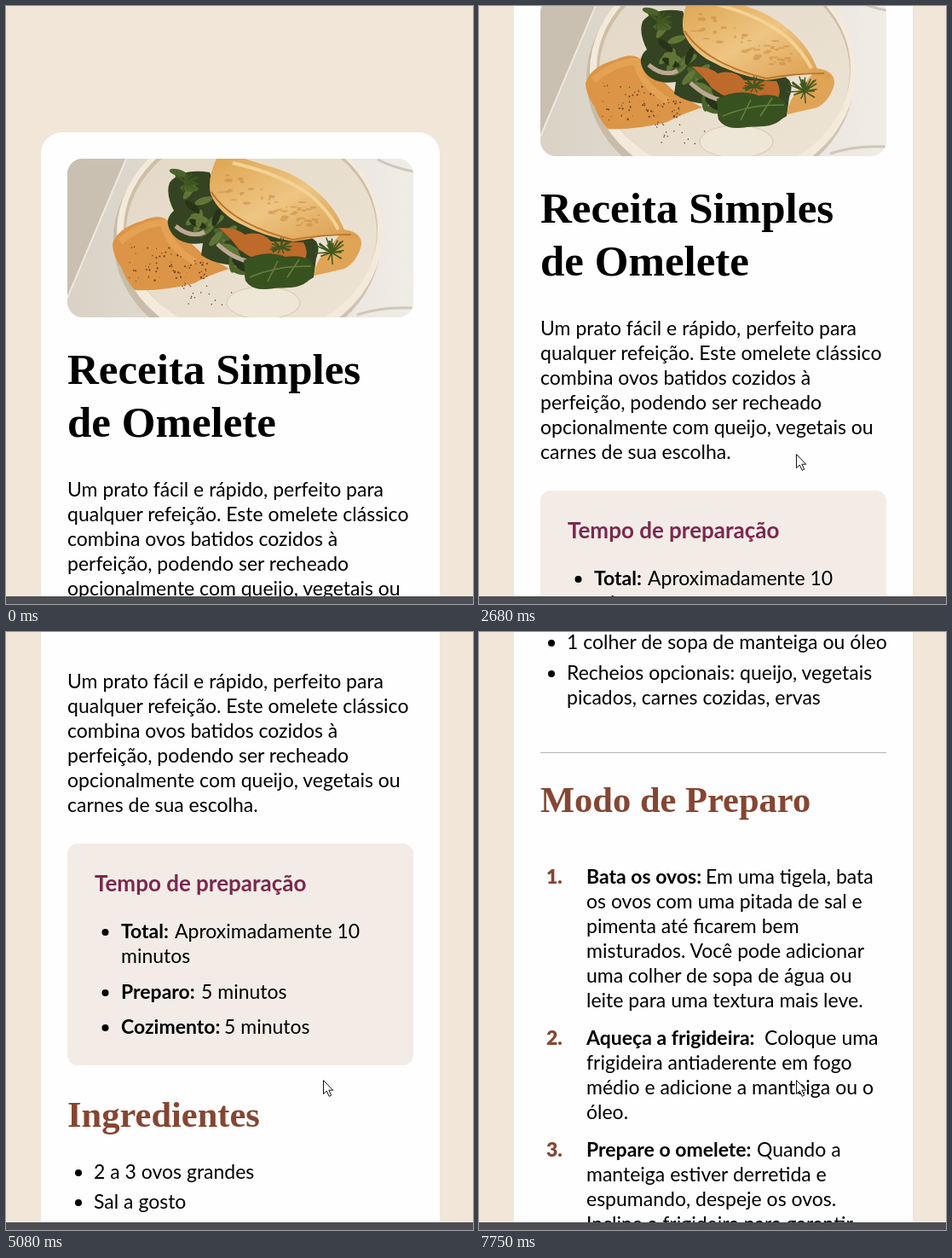
Recreate the animation shown at these times as an HTML page. Size 548 px wide and 701 px high, loop 8000 ms.

```html
<!DOCTYPE html>
<html lang="pt">
<head>
<meta charset="utf-8">
<style>
  html, body { margin: 0; width: 100%; height: 100%; overflow: hidden; background: #f2e6d9; }
  svg { display: block; }
  text { font: 23px Lato, sans-serif; white-space: pre; }
  .bold { font-weight: 700; }
  .sub { font-size: 26px; font-weight: 700; fill: #7b284f; }
  .title, .head { font-family: "Liberation Serif", serif; font-weight: 700; }
  .title { font-size: 51px; }
  .head { font-size: 42.5px; fill: #854632; }
  .num { font-weight: 900; fill: #854632; }
</style>
</head>
<body>
<svg width="548" height="701" viewBox="0 0 548 701">
  <defs>
    <clipPath id="photo"><rect x="72" y="179" width="406" height="186" rx="18"/></clipPath>
    <linearGradient id="marble"><stop offset="0" stop-color="#d9d2c5"/><stop offset="1" stop-color="#f0ece6"/></linearGradient>
    <linearGradient id="plate" x2="1" y2="1"><stop offset="0" stop-color="#e3d8c6"/><stop offset="1" stop-color="#eee4d5"/></linearGradient>
    <linearGradient id="egg" x2="1" y2="1"><stop offset="0" stop-color="#dda450"/><stop offset=".5" stop-color="#eec583"/><stop offset="1" stop-color="#d99a49"/></linearGradient>
  </defs>
  <g id="page">
    <rect x="41" y="148" width="468" height="2200" rx="25" fill="#fefefe"/>
    <g clip-path="url(#photo)">
      <path d="M72 179H478V365H72Z" fill="url(#marble)"/>
      <path d="M72 179H141L72 342Z" fill="#c9c0b1"/>
      <path d="M141 179L72 342" stroke="#eee8de" stroke-width="2"/>
      <path d="M436 180q20 10 42 14M412 362q30 -10 66 -8" fill="none" stroke="#cfc7bb" stroke-width="3"/>
      <ellipse cx="283" cy="274" rx="157" ry="134" fill="#b9a78e" opacity=".55"/>
      <ellipse cx="286" cy="266" rx="156" ry="134" fill="#f3eadc"/>
      <ellipse cx="287" cy="262" rx="149" ry="124" fill="#cfbfa7"/>
      <ellipse cx="288" cy="265" rx="147" ry="123" fill="url(#plate)"/>
      <ellipse cx="302" cy="348" rx="43" ry="19" fill="#eee6d7" stroke="#d5c7b0"/>
      <path d="M125 279Q131 260 160 252Q184 241 194 256L232 292Q252 302 262 308Q236 316 221 325Q180 335 151 333Q141 322 136 308Q125 292 125 279Z" fill="#dc9546"/>
      <path d="M134 276Q160 254 185 254Q190 282 222 300" fill="none" stroke="#e9ac60" stroke-width="8" opacity=".6"/>
      <g id="pepper" fill="#704322"/>
      <path d="M192 207Q206 190 239 195L252 225Q252 249 285 258L355 270Q372 276 364 296L361 318Q340 333 313 330Q290 336 281 322L278 303Q250 306 229 292L231 278Q202 282 192 262Q186 249 197 240Q187 220 192 207Z" fill="#344321"/>
      <g id="leaves"/>
      <path d="M199 258q18 15 34 7M248 279q18 17 36 20" fill="none" stroke="#bda993" stroke-width="5"/>
      <path d="M250 260q21 0 30 8q20 -5 31 8l38 1q7 12 1 22q-16 -4 -26 1l-13 -10q-14 8 -26 3l-12 -8q-8 -12 -23 -25Z" fill="#be6a2a"/>
      <path d="M279 298Q304 285 328 294Q360 290 362 311Q354 333 320 330Q289 337 281 320Z" fill="#38521f"/>
      <path d="M286 318Q318 304 358 305M307 323l12 -24M330 318l14 -21" fill="none" stroke="#66803c" stroke-width="1.5"/>
      <path d="M397 262Q418 265 417 280Q412 300 397 308L362 316Q362 300 378 284Z" fill="#e0a456"/>
      <path d="M247 179Q236 202 240 220Q247 238 267 251Q300 270 337 276Q360 273 378 268Q400 268 414 274Q409 264 397 263Q387 236 364 217Q339 195 305 187L274 177Z" fill="url(#egg)"/>
      <path d="M241 218Q265 256 337 274Q368 268 405 268" fill="none" stroke="#bd782e" stroke-width="2"/>
      <path d="M266 184Q328 198 362 226Q381 244 390 262" fill="none" stroke="#f3d294" stroke-width="4"/>
      <g id="toast" fill="#c18136" opacity=".45"/>
      <path id="dill" fill="none" stroke="#40571f" stroke-width="1.5"/>
    </g>
    <rect x="72" y="757" width="406" height="260" rx="12" fill="#f3ece6"/>
    <rect x="72" y="1376" width="406" height="1" fill="#b5b3b1"/>
    <g id="copy"></g>
  </g>
  <path id="cursor" d="M.5 .5V16.6L4.3 13.1L7.2 19.3L9.7 18.1L6.9 12.2H11.7Z" fill="#fff" stroke="#111"/>
  <rect y="692" width="548" height="9" fill="#4d4d54"/>
</svg>
<script>
const $ = id => document.getElementById(id);
const LEADING = 29;
let copy = '';

const line = (x, y, text, style = '') => copy += `<text x="${x}" y="${y}" class="${style}">${text}</text>`;
const lines = (x, y, texts) => texts.forEach((text, i) => line(x, y + i * LEADING, text));
const bullet = (x, y) => copy += `<circle cx="${x}" cy="${y - 7}" r="4"/>`;
// A bold label, the text after it, then the wrapped lines below.
function labelled(x, y, label, tailX, tail, rest = []) {
  line(x, y, label, 'bold');
  line(tailX, y, tail);
  lines(x, y + LEADING, rest);
}

line(72, 443, 'Receita Simples', 'title');
line(72, 505, 'de Omelete', 'title');
lines(72, 575, [
  'Um prato fácil e rápido, perfeito para',
  'qualquer refeição. Este omelete clássico',
  'combina ovos batidos cozidos à',
  'perfeição, podendo ser recheado',
  'opcionalmente com queijo, vegetais ou',
  'carnes de sua escolha.'
]);

line(104, 813, 'Tempo de preparação', 'sub');
[868, 939, 980].forEach(y => bullet(116.5, y));
labelled(135, 868, 'Total:', 198, 'Aproximadamente 10', ['minutos']);
labelled(135, 939, 'Preparo:', 229, '5 minutos');
labelled(135, 980, 'Cozimento:', 256, '5 minutos');

line(72, 1089, 'Ingredientes', 'head');
[1150, 1185, 1220, 1255, 1291].forEach(y => bullet(85, y));
line(103, 1150, '2 a 3 ovos grandes');
line(103, 1185, 'Sal a gosto');
line(103, 1220, 'Pimenta a gosto');
line(103, 1255, '1 colher de sopa de manteiga ou óleo');
lines(103, 1291, ['Recheios opcionais: queijo, vegetais', 'picados, carnes cozidas, ervas']);

line(72, 1446, 'Modo de Preparo', 'head');
[1530, 1719, 1850].forEach((y, i) => line(79, y, `${i + 1}.`, 'num'));
labelled(126, 1530, 'Bata os ovos:', 266, 'Em uma tigela, bata', [
  'os ovos com uma pitada de sal e',
  'pimenta até ficarem bem',
  'misturados. Você pode adicionar',
  'uma colher de sopa de água ou',
  'leite para uma textura mais leve.'
]);
labelled(126, 1719, 'Aqueça a frigideira:', 335, 'Coloque uma', [
  'frigideira antiaderente em fogo',
  'médio e adicione a manteiga ou o',
  'óleo.'
]);
labelled(126, 1850, 'Prepare o omelete:', 326, 'Quando a', [
  'manteiga estiver derretida e',
  'espumando, despeje os ovos.',
  'Incline a frigideira para garantir'
]);
$('copy').innerHTML = copy;

// Small details of the dish.
let seed = 7;
const random = () => (seed = seed * 16807 % 2147483647) / 2147483647;
const scatter = (count, draw) => Array.from({ length: count }, draw).join('');

$('pepper').innerHTML = scatter(70, () => {
  const u = random(), v = random();
  return `<circle cx="${145 + u * 95}" cy="${265 + u * 38 + v * (58 - u * 40)}" r="${.4 + random() * .8}"/>`;
}) + scatter(18, () => `<circle cx="${205 + random() * 60}" cy="${325 + random() * 26}" r=".8"/>`);

$('leaves').innerHTML = scatter(26, () => {
  const u = random(), x = 202 + u * 75, y = 203 + u * 82 + random() * 38 - 8;
  const color = ['#263419', '#4b632b', '#617537'][Math.floor(random() * 3)];
  return `<ellipse cx="${x}" cy="${y}" rx="11" ry="4" fill="${color}" transform="rotate(${random() * 180} ${x} ${y})"/>`;
});

$('toast').innerHTML = scatter(45, () => {
  const u = random();
  return `<ellipse cx="${252 + u * 120}" cy="${193 + u * 46 + random() * 30}" rx="${1 + random() * 4}" ry="${.7 + random() * 1.6}"/>`;
});

const sprig = (x, y, size) => scatter(22, () => {
  const angle = random() * 2 * Math.PI, length = size * (.5 + random() * .5);
  return `M${x} ${y}l${length * Math.cos(angle)} ${length * Math.sin(angle) * .8}`;
});
$('dill').setAttribute('d', sprig(382, 289, 23) + sprig(323, 283, 15) + sprig(210, 207, 18));

// Scroll bursts: start, end, number of steps, distance at rest afterwards.
const bursts = [
  [1600, 2070, 8, 139], [2210, 2210, 1, 140], [2540, 2950, 7, 266],
  [3360, 3620, 5, 325], [4090, 4360, 5, 395], [4750, 5150, 7, 535],
  [5560, 5890, 5, 710], [6230, 6430, 4, 885], [6830, 7030, 4, 1060],
  [7560, 7750, 3, 1235]
];

function scrollAt(t) {
  let from = 0;
  for (const [start, end, steps, to] of bursts) {
    if (t < start) break;
    if (t < end) {
      const step = Math.floor((t - start) / (end - start) * (steps - 1) + 1.05);
      const eased = (1 - Math.cos(Math.PI * step / steps)) / 2;
      return Math.round(from + (to - from) * eased);
    }
    from = to;
  }
  return from;
}

function cursorAt(t) {
  if (t < 590) return [459, 653];
  return t < 660 ? [394, 557] : [372, 525];
}

function draw(now) {
  const t = now % 8000;
  $('page').setAttribute('transform', `translate(0 ${-scrollAt(t)})`);
  $('cursor').setAttribute('transform', `translate(${cursorAt(t)})`);
  $('cursor').setAttribute('visibility', t < 520 ? 'hidden' : 'visible');
}

let began;
function tick(now) {
  began ??= now;
  draw(now - began);
  requestAnimationFrame(tick);
}
draw(0);
requestAnimationFrame(tick);
</script>
</body>
</html>
```
